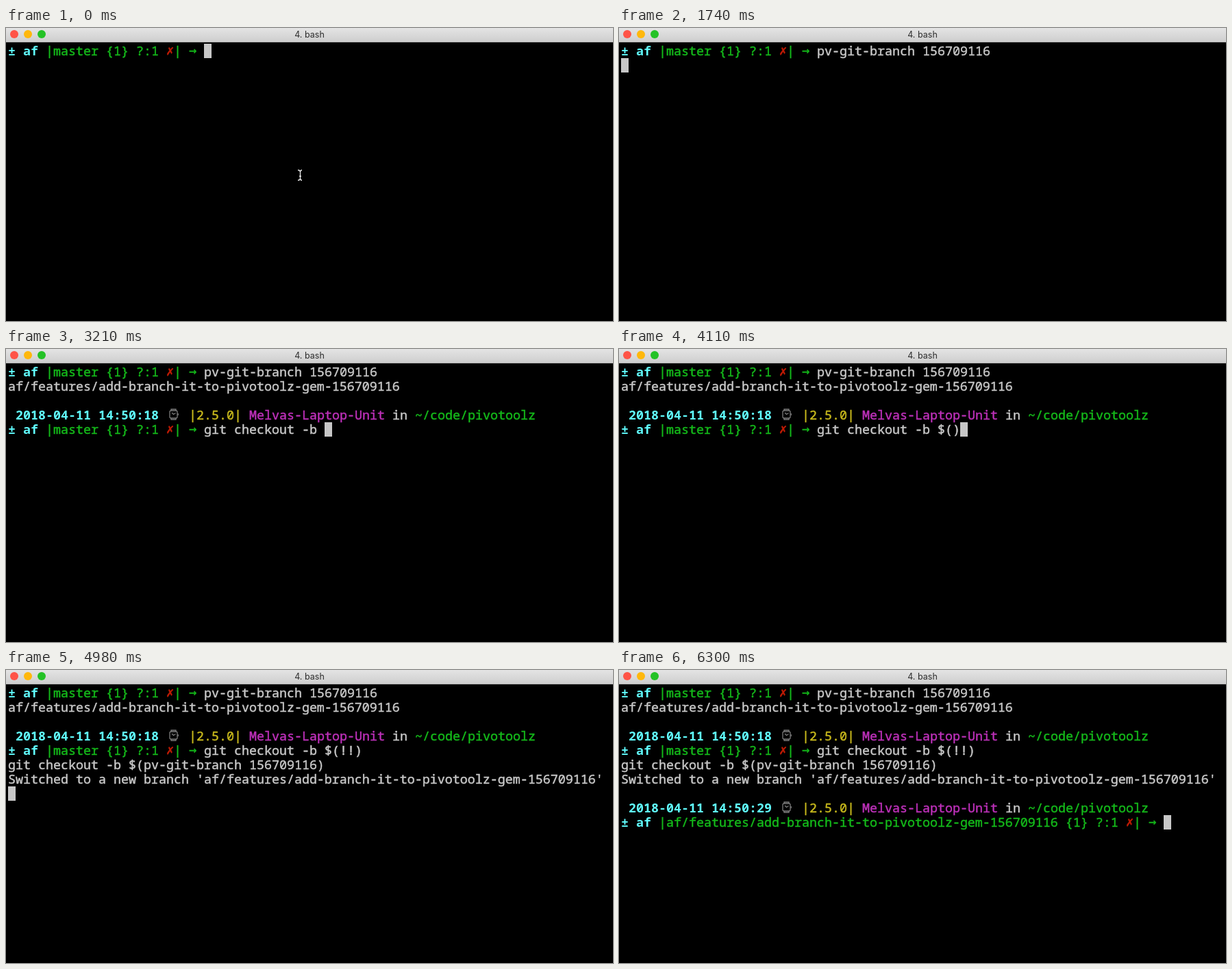
These frames come from a looping animation (886x428 px, 6.33 s). An HTML page:

```html
<!DOCTYPE html>
<html lang="en">
<head>
<meta charset="utf-8">
<title>Terminal</title>
<style>
  html, body { margin: 0; width: 100%; height: 100%; overflow: hidden; background: #000; }
  #stage { position: relative; width: 886px; height: 428px; overflow: hidden; background: #000; }
  #bar {
    position: absolute; left: 0; top: 0; width: 886px; height: 21px; box-sizing: border-box;
    background: linear-gradient(#e4e4e4, #cecece); border-bottom: 1px solid #aeaeae;
    font: 12.5px/19px Inter, Roboto, sans-serif; color: #2c2c2c; text-align: center;
  }
  #bar i { position: absolute; top: 3px; width: 12px; height: 12px; border-radius: 50%; }
  #screen span {
    position: absolute; white-space: pre;
    font: 500 18.333px/21px "Noto Sans Mono", "DejaVu Sans Mono", monospace;
    -webkit-text-stroke: 0.5px currentColor;
  }
  #screen svg, #mouse { position: absolute; }
  #screen .sign { font-family: "DejaVu Sans Mono", "Noto Sans Mono", monospace; }
  #screen .cyan { color: #60fdff; font-weight: 700; -webkit-text-stroke: 0; }
  .plain { color: #c7c7c7; }
  .green { color: #14b81a; }
  .red { color: #c01b04; }
  .yellow { color: #c7b81c; }
  .pink { color: #bc30b8; }
  #cursor { position: absolute; width: 11px; height: 21px; background: #c7c7c7; }
</style>
</head>
<body>
<div id="stage">
  <div id="bar">
    <i style="left:6px;background:#ff5447"></i>
    <i style="left:26px;background:#ffb80c"></i>
    <i style="left:46px;background:#24c226"></i>
    4. bash
  </div>
  <div id="screen"></div>
  <div id="cursor"></div>
  <svg id="mouse" style="left:424px;top:206px" width="11" height="18" fill="none" stroke="#e6e6e6" stroke-width="1.3">
    <path d="M2 1.5Q5 1.5 5.5 4Q6 1.5 8 1.5M5.5 4V14M2 16.5Q5 16.5 5.5 14Q6 16.5 8 16.5M4 10.5H7"/>
  </svg>
</div>
<script>
const LOOP = 6330, TICK = 30, CELL = 11, LINE = 21, LEFT = 3, TOP = 23;
const screen = document.getElementById('screen');
const cursor = document.getElementById('cursor');
const mouse = document.getElementById('mouse');
const parts = [], stops = [];
const branch = 'af/features/add-branch-it-to-pivotoolz-gem-156709116';

const x = col => LEFT + col * CELL;
const y = row => TOP + row * LINE;

// Number of characters visible at time t; no step means all at once.
function shown(p, t) {
  if (t < p.from || t >= p.until) return 0;
  return p.step ? Math.min(p.text.length, Math.floor((t - p.from) / p.step) + 1) : p.text.length;
}

function put(row, col, text, look, from = 0, step = 0, until = LOOP) {
  const el = document.createElement('span');
  el.className = look;
  el.style.left = x(col) + 'px';
  el.style.top = y(row) - 1 + 'px';
  screen.append(el);
  const part = { el, row, col, text, from, step, until };
  parts.push(part);
  return part;
}

function type(row, col, text, from, step) {
  stops.push(put(row, col, text, 'plain', from, step));
}

function moveTo(row, col, from) {
  stops.push({ row, col, from, until: LOOP, text: '' });
}

function prompt(row, name, from) {
  const status = `|${name} {1} ?:1 `;
  const end = 5 + status.length;
  put(row, 0, '±', 'cyan', from);
  put(row, 2, 'af', 'cyan', from);
  put(row, 5, status, 'green', from);
  put(row, end, '✗', 'red sign', from);
  put(row, end + 1, '|', 'green', from);
  put(row, end + 3, '→', 'green sign', from);
  moveTo(row, end + 5, from);
}

function watch(row, from) {
  const box = document.createElement('template');
  box.innerHTML = `<svg width="20" height="21" style="left:235px;top:${y(row)}px"
    fill="none" stroke="#7c7c7c" stroke-width="1.3">
    <path d="M6 4V2H13V4M6 15V17H13V15M7 7L9.5 9.5L12.5 7.5"/>
    <rect x="4" y="4" width="11" height="11" rx="2"/><path d="M16.2 8V11"/></svg>`;
  const el = box.content.firstChild;
  screen.append(el);
  parts.push({ el, icon: true, from });
}

function header(row, clock, from) {
  put(row, 1, '2018-04-11 ' + clock, 'cyan', from);
  watch(row, from);
  put(row, 24, '|2.5.0|', 'yellow', from);
  put(row, 32, 'Melvas-Laptop-Unit', 'pink', from);
  put(row, 51, 'in', 'plain', from);
  put(row, 54, '~/code/pivotoolz', 'green', from);
}

// First command
prompt(0, 'master', 0);
type(0, 26, 'pv-git-branch', 150, 60);
type(0, 39, ' ', 1080, 0);
type(0, 40, '156709116', 1380, 0);
moveTo(1, 0, 1560);
put(1, 0, branch, 'plain', 1770);
moveTo(2, 0, 1770);
header(3, '14:50:18', 1890);
prompt(4, 'master', 1890);

// Second command, with the brackets filled in afterwards
type(4, 26, 'gi', 2250, 60);
type(4, 28, 't checkout -b ', 2370, 60);
type(4, 42, '$(', 3480, 150);
stops.push(put(4, 44, ')', 'plain', 3840, 0, 4320));
moveTo(4, 44, 4200);
type(4, 44, '!!', 4320, 120);
put(4, 45, ')', 'plain', 4320, 0, 4440);
put(4, 46, ')', 'plain', 4440);
put(5, 0, 'git checkout -b $(pv-git-branch 156709116)', 'plain', 4680);
moveTo(6, 0, 4680);
put(6, 0, `Switched to a new branch '${branch}'`, 'plain', 4830);
moveTo(7, 0, 4830);
header(8, '14:50:29', 5160);
prompt(9, branch, 5160);

function draw(now) {
  const t = Math.floor((now % LOOP) / TICK) * TICK;
  for (const p of parts) {
    if (p.icon) {
      p.el.style.visibility = t >= p.from ? 'visible' : 'hidden';
      continue;
    }
    const text = p.text.slice(0, shown(p, t));
    if (p.el.textContent !== text) p.el.textContent = text;
  }
  const stop = stops.filter(s => s.from <= t).pop();
  cursor.style.left = x(stop.col + shown(stop, t)) + 'px';
  cursor.style.top = y(stop.row) + 'px';
  mouse.style.visibility = t < 150 ? 'visible' : 'hidden';
}

function frame() {
  draw(performance.now());
  requestAnimationFrame(frame);
}
frame();
</script>
</body>
</html>
```
